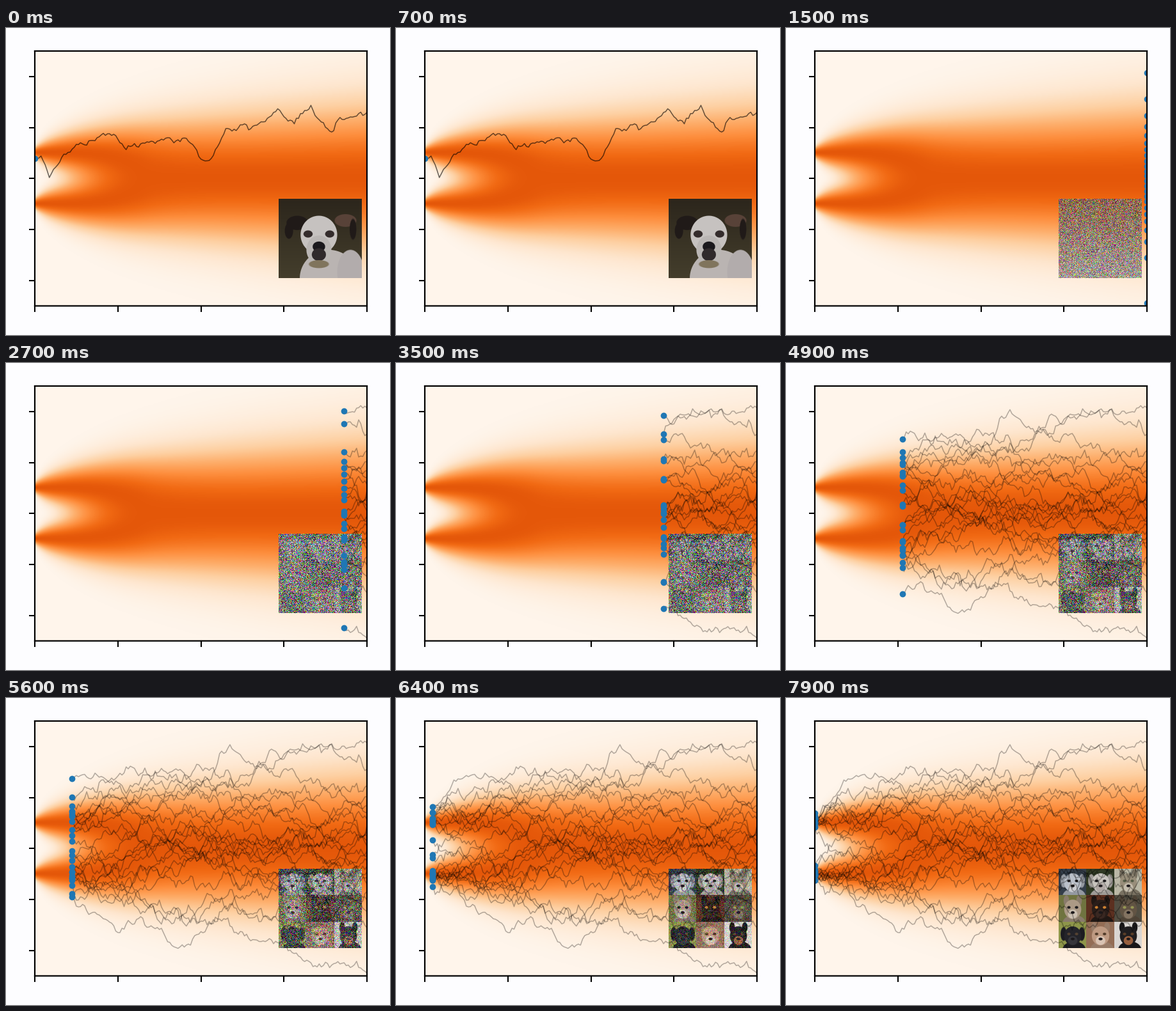
Animation of 600x480 px, one loop 8 s. Source, as a matplotlib script:

```python
import numpy as np
import matplotlib.pyplot as plt
from matplotlib.animation import FuncAnimation
from matplotlib.colors import to_rgb

FRAMES, INTERVAL = 80, 100
LEFT, RIGHT, TOP, BOTTOM = 45, 564, 36, 434.5
UNIT = (BOTTOM - TOP) / 10          # pixels per data unit
MIDDLE = (TOP + BOTTOM) / 2
VARIANCE = 3.0                      # diffusion variance at the right edge
CUT = 10                            # the single sample gives way to many
START, DURATION = 19.8, 59.5        # reverse pass, in frames
SAMPLES = 24
H, W = 124, 130
rng = np.random.default_rng(7)


def density():
    t = np.linspace(0, 1, 519)[None, :]
    y = (MIDDLE - np.linspace(TOP, BOTTOM, 398))[:, None] / UNIT
    var = 0.02 + VARIANCE * t
    p = np.exp(-(y - 1) ** 2 / (2 * var)) + np.exp(-(y + 1) ** 2 / (2 * var))
    return p / p.max(axis=0)


# ---------- trajectories ----------
grid = np.linspace(LEFT, RIGHT, 161)
STEP = UNIT * np.sqrt(VARIANCE / (grid.size - 1))


def bridge(points, step=STEP):
    """Random walk pinned to the given (x, y) points."""
    xs, ys = np.transpose(points)
    walk = np.cumsum(rng.normal(0, step, grid.size))
    drift = np.interp(grid, xs, np.interp(xs, grid, walk))
    return np.interp(grid, xs, ys) + walk - drift


def sample_path(p):
    """Path from one of the two modes to the quantile p at the right edge."""
    end = 1.15 * np.log(p / (1 - p))
    mode = 1 if end + rng.normal(0, 1) > 0 else -1
    start = mode + rng.normal(0, 0.17)
    return bridge([(LEFT, MIDDLE - UNIT * start), (RIGHT, MIDDLE - UNIT * end)])


single = bridge([(45, 204), (55, 200), (67, 234), (92, 196), (133, 176),
                 (170, 166), (185, 188), (242, 174), (290, 180), (306, 207),
                 (322, 204), (345, 155), (382, 158), (427, 127), (450, 150),
                 (476, 121), (511, 164), (520, 140), (564, 132)], step=3)
upper = bridge([(45, 195), (95, 128), (220, 120), (305, 132), (350, 73),
                (400, 108), (500, 76), (564, 70)], step=4)
lower = bridge([(45, 275), (170, 361), (215, 348), (277, 389), (340, 345),
                (470, 410), (564, 430)], step=4)
quantiles = (np.arange(SAMPLES) + 0.5) / SAMPLES
paths = [upper, lower] + [sample_path(p) for p in quantiles[1:-1]]


# ---------- inset pictures ----------
def ellipse(img, cx, cy, rx, ry, color):
    h, w = img.shape[:2]
    y, x = np.mgrid[:h, :w]
    d = np.hypot((x / w - cx) / rx, (y / h - cy) / ry)
    cover = np.clip((1 - d) * min(rx * w, ry * h) + 0.5, 0, 1)[..., None]
    img[:] = img * (1 - cover) + np.array(to_rgb(color)) * 255 * cover


def big_dog():
    img = np.empty((H, W, 3))
    img[:] = np.linspace((44, 38, 28), (68, 62, 44), H)[:, None]
    ellipse(img, .60, 1.00, .35, .36, "#bab4b2")
    ellipse(img, .86, .92, .16, .28, "#b2acac")
    ellipse(img, .22, .30, .13, .09, "#201a18")
    ellipse(img, .12, .40, .05, .10, "#201a18")
    ellipse(img, .80, .27, .13, .08, "#584238")
    ellipse(img, .89, .38, .04, .13, "#201a18")
    ellipse(img, .48, .45, .22, .24, "#c6c2c0")
    ellipse(img, .48, .64, .15, .18, "#bab6b4")
    for cx in (.35, .61):
        ellipse(img, cx, .44, .055, .045, "#342c2c")
    ellipse(img, .48, .60, .075, .065, "#1a181c")
    ellipse(img, .48, .70, .085, .08, "#302a2c")
    ellipse(img, .48, .82, .12, .05, "#80745c")
    return img


def portrait(cell, back, fur, muzzle, eye, floppy):
    cell[:] = np.array(to_rgb(back)) * 255
    shade = np.array(to_rgb(fur)) * .8
    ellipse(cell, .55, 1.05, .42, .32, shade)
    for side in (-1, 1):
        if floppy:
            ellipse(cell, .5 + side * .33, .45, .11, .26, shade)
        else:
            ellipse(cell, .5 + side * .23, .20, .10, .20, shade)
    ellipse(cell, .5, .52, .31, .36, fur)
    ellipse(cell, .5, .70, .17, .17, muzzle)
    for side in (-1, 1):
        ellipse(cell, .5 + side * .14, .45, .06, .05, eye)
    ellipse(cell, .5, .64, .07, .05, "#1c181a")


def gallery():
    # background, fur, muzzle, eyes, floppy ears
    animals = [
        ("#343e4a", "#bac0ca", "#cdced2", "#1e1c1e", True),
        ("#303a24", "#c8c4be", "#b0a8a4", "#1e1c1e", True),
        ("#bab8a6", "#988e7a", "#c4bcac", "#565c46", False),
        ("#707440", "#ac9a86", "#ccc0b2", "#1e1c1e", False),
        ("#5c3020", "#2a1e1a", "#3a2822", "#ce8232", False),
        ("#524e42", "#625444", "#847462", "#969654", False),
        ("#8e964a", "#24242a", "#36363c", "#544232", True),
        ("#946e56", "#be9a82", "#dac4b4", "#543e2c", False),
        ("#dad6d2", "#201e20", "#98603e", "#5a3e28", False),
    ]
    img = np.zeros((H, W, 3))
    ys = np.linspace(0, H, 4).round().astype(int)
    xs = np.linspace(0, W, 4).round().astype(int)
    for i, animal in enumerate(animals):
        r, c = divmod(i, 3)
        portrait(img[ys[r]:ys[r + 1], xs[c]:xs[c + 1]], *animal)
    return img


def noised(img, u):
    sigma = 1.1 * (u / .33) ** 1.3
    return 127 + (img - 127 + 75 * sigma * noise) / np.sqrt(1 + sigma ** 2)


def to_pixels(img):
    return np.clip(img, 0, 255).astype(np.uint8)


noise = rng.normal(0, 1, (H, W, 3))
dog, pets = big_dog(), gallery()
tint = np.linspace((140, 104, 80), (164, 154, 148), H)[:, None]
tinted_noise = tint + 50 * noise[::-1]

# ---------- stage ----------
fig = plt.figure(figsize=(6, 4.8), dpi=100, facecolor="#fdfdff")
ax = fig.add_axes([LEFT / 600, 1 - BOTTOM / 480,
                   (RIGHT - LEFT) / 600, (BOTTOM - TOP) / 480])
ax.imshow(density(), cmap="Oranges", vmin=0, vmax=1.45, aspect="auto",
          extent=(LEFT, RIGHT, BOTTOM, TOP))
inset = ax.imshow(to_pixels(dog), aspect="auto", interpolation="nearest",
                  extent=(425.5, 555.5, 391, 267), zorder=1)
ax.set(xlim=(LEFT, RIGHT), ylim=(BOTTOM, TOP),
       xticks=np.linspace(LEFT, RIGHT, 5),
       yticks=MIDDLE + 2 * UNIT * np.arange(-2, 3))
ax.tick_params(length=6.5, width=1.5, labelbottom=False, labelleft=False)
for spine in ax.spines.values():
    spine.set(linewidth=1.6, snap=False)

single_line, = ax.plot(grid, single, color="black", alpha=.6, lw=1.1)
trails = [ax.plot([], [], color="black", alpha=.3, lw=1.1)[0] for _ in paths]
dots, = ax.plot([], [], "o", color="tab:blue", ms=6, zorder=2.4)


def noise_level(frame):
    s = np.clip((frame - START) / DURATION, 0, 1)
    return (1 + np.cos(np.pi * s)) / 2


def draw(frame):
    alone = frame < CUT
    u = 0 if alone else noise_level(frame)
    x = LEFT + (RIGHT - LEFT) * u ** 2
    heads = [np.interp(x, grid, y) for y in ([single] if alone else paths)]
    dots.set_data([x] * len(heads), heads)
    single_line.set_visible(alone)
    passed = grid > x
    for trail, path in zip(trails, paths):
        trail.set_visible(not alone)
        trail.set_data(np.r_[x, grid[passed]],
                       np.r_[np.interp(x, grid, path), path[passed]])
    if alone:
        picture = dog
    else:
        picture = tinted_noise if u == 1 else noised(pets, u)
    inset.set_data(to_pixels(picture))
    return [inset, single_line, dots, *trails]


anim = FuncAnimation(fig, draw, frames=FRAMES, interval=INTERVAL,
                     repeat=True, repeat_delay=0)
plt.show()
```
